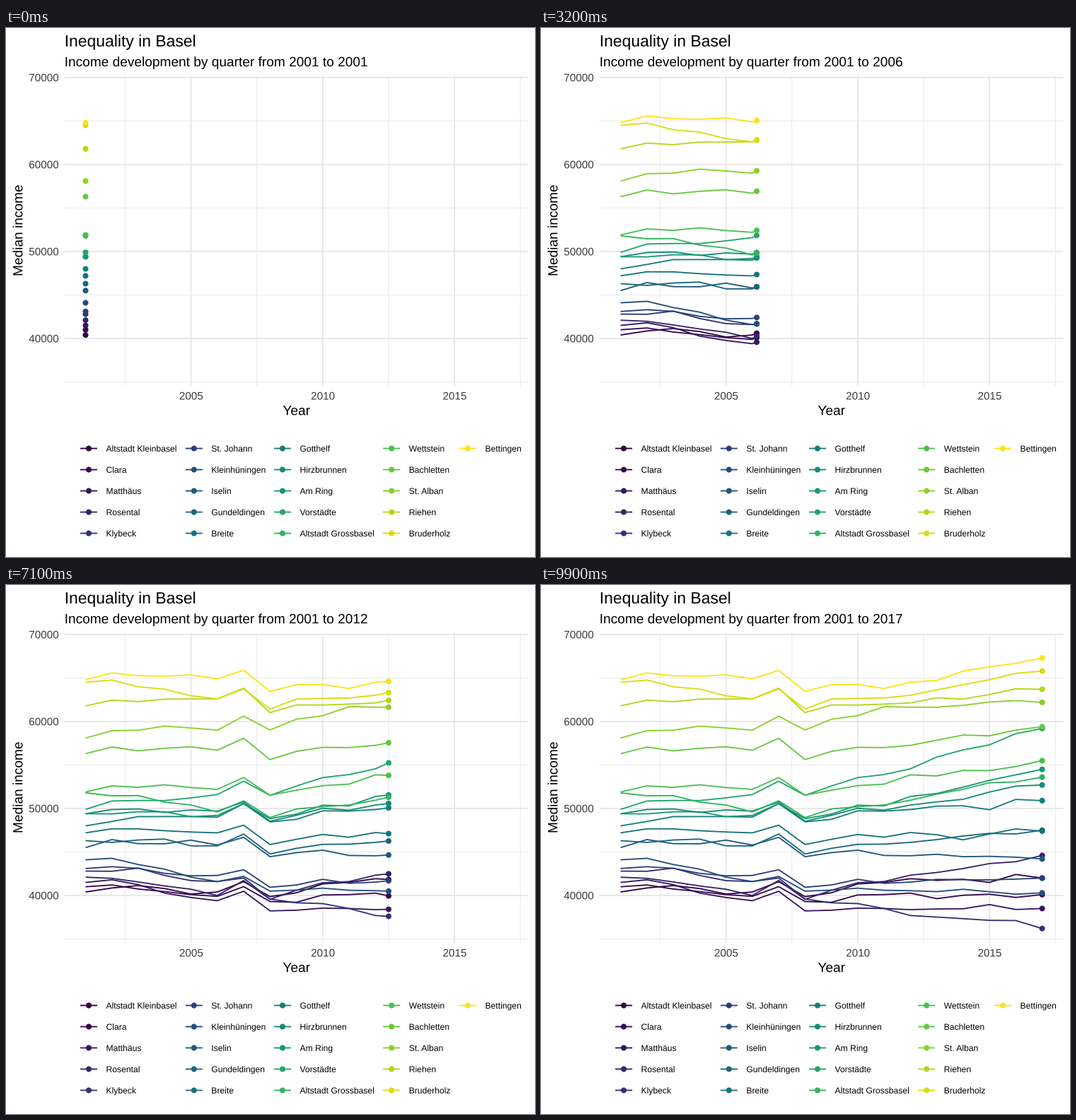
A matplotlib script that plays this animation: 748 px wide and 748 px high, repeating every 10000 ms.

```python
import numpy as np
import matplotlib.pyplot as plt
from matplotlib.animation import FuncAnimation
from matplotlib.patches import PathPatch
from matplotlib.textpath import TextPath
from matplotlib.transforms import Affine2D

plt.rcParams["font.family"] = "Liberation Sans"

SIZE, DPI, FRAMES = 748, 125, 100
LEFT, RIGHT, TOP, BOTTOM = 82.7, 738.45, 67.6, 505.8
LINE, DOT = 1.067, 4.65
YEARS = np.arange(2001, 2018)
# the frame on which each year is reached
KEYS = [round(k * (FRAMES - 1) / 16) for k in range(17)]

# every income follows a trend, the city's business cycle and some noise
TURNS = [2001, 2006, 2011, 2017]
CYCLE = np.interp(YEARS, [2001, 2002, 2006, 2007, 2008, 2009, 2010],
                  [0, 0.5, 0, 1.1, -1, -0.4, 0])
rng = np.random.default_rng(4)
quarters = []


def quarter(name, *trend):
    """Add a quarter; the trend is in thousands at each turning year."""
    noise = np.where(np.isin(YEARS, TURNS), 0, rng.normal(0, 0.22, len(YEARS)))
    quarters.append((name, 1000 * (np.interp(YEARS, TURNS, trend) + CYCLE + noise)))


quarter("Altstadt Kleinbasel", 40.4, 40.4, 41.5, 42)
quarter("Clara", 41, 39.9, 40.1, 40.1)
quarter("Matthäus", 41.5, 39.4, 38.5, 38.5)
quarter("Rosental", 42.1, 40, 41.6, 44.6)
quarter("Klybeck", 42.8, 41.6, 38.5, 36.2)
quarter("St. Johann", 43.1, 42.3, 41.4, 42)
quarter("Kleinhüningen", 44.1, 41.6, 40.6, 40.3)
quarter("Iselin", 45.5, 45.8, 44.6, 44.2)
quarter("Gundeldingen", 46.3, 45.7, 45.9, 47.5)
quarter("Breite", 47.2, 47.2, 46.7, 47.4)
quarter("Gotthelf", 48, 49, 49.7, 50.9)
quarter("Hirzbrunnen", 49.4, 49.7, 49.8, 52.7)
quarter("Am Ring", 49.4, 49.2, 50.3, 54.5)
quarter("Vorstädte", 49.9, 51.6, 53.9, 59.2)
quarter("Altstadt Grossbasel", 51.8, 49.6, 50.4, 53.6)
quarter("Wettstein", 51.9, 52.2, 52.8, 55.5)
quarter("Bachletten", 56.3, 56.7, 57, 59.4)
quarter("St. Alban", 58.1, 59, 61.7, 62.2)
quarter("Riehen", 61.8, 62.6, 62, 63.7)
quarter("Bruderholz", 64.5, 62.6, 62.7, 65.8)
quarter("Bettingen", 64.8, 64.9, 63.8, 67.3)


def shade(rgb):
    """Slightly deeper tone, as on a 1.8 gamma display."""
    return tuple(np.array(rgb) ** (2.2 / 1.8))


COLORS = [shade(c[:3]) for c in plt.cm.viridis(np.linspace(0, 1, len(quarters)))]
GRID, GREY = shade([0.922] * 3), shade([0.302] * 3)


def px(year):
    return LEFT + (year - 2000.2) * (RIGHT - LEFT) / 17.6


def py(income):
    return 70 + (70000 - income) * 0.0123


fig = plt.figure(figsize=(SIZE / DPI, SIZE / DPI), dpi=DPI, facecolor="white")
ax = fig.add_axes([0, 0, 1, 1])
ax.set_xlim(0, SIZE)
ax.set_ylim(SIZE, 0)
ax.axis("off")


def glyphs(text, size=11):
    return TextPath((0, 0), text, size=size * DPI / 72)


def label(x, y, text, size=11, color="black", align=0, angle=0):
    """Text on baseline y; align 0 is left, 0.5 centre, 1 right."""
    path = glyphs(text, size)
    shift = -align * path.get_extents().x1
    place = Affine2D().translate(shift, 0).rotate_deg(angle).scale(1, -1).translate(x, y)
    return ax.add_patch(PathPatch(path, fc=color, lw=0, zorder=2,
                                  transform=place + ax.transData))


def line(xs, ys, color, width=LINE, z=1):
    return ax.plot(xs, ys, color=color, lw=width, zorder=z, snap=False,
                   solid_capstyle="butt", solid_joinstyle="round")[0]


def dots(xs, ys):
    return ax.scatter(xs, ys, s=DOT ** 2, c=COLORS, lw=0, zorder=4, snap=False)


# grid: thin minor lines, thicker major ones
for year in np.arange(2002.5, 2018, 2.5):
    major = year % 5 == 0
    line([px(year)] * 2, [TOP, BOTTOM], GRID, LINE if major else LINE / 2)
    if major:
        label(px(year), 525.4, f"{year:.0f}", 8.8, GREY, align=0.5)
for income in range(35000, 70001, 5000):
    major = income % 10000 == 0
    line([LEFT, RIGHT], [py(income)] * 2, GRID, LINE if major else LINE / 2)
    if major:
        label(74.1, py(income) + 5.4, str(income), 8.8, GREY, align=1)

label(LEFT, 26.1, "Inequality in Basel", 13.2)
subtitle = label(LEFT, 54.2, "Income")
label((LEFT + RIGHT) / 2, 547.2, "Year", align=0.5)
label(23.3, (TOP + BOTTOM) / 2, "Median income", align=0.5, angle=90)

# legend, filled column by column
COLUMNS = [117, 265.8, 391, 545.2, 653]
spots = np.array([(COLUMNS[i // 5], 594.5 + 30 * (i % 5)) if i < 20 else (COLUMNS[4], 594.5)
                  for i in range(len(quarters))])
for (name, _), (x, y), color in zip(quarters, spots, COLORS):
    line([x - 12, x + 12], [y, y], color)
    label(x + 24.5, y + 4.4, name, 7)
dots(*spots.T)

lines = [line([], [], c, z=3) for c in COLORS]
heads = dots(*spots.T)


def update(i):
    now = np.interp(i, KEYS, YEARS)
    past = YEARS < now
    xs = px(np.append(YEARS[past], now))
    tips = []
    for (_, income), path in zip(quarters, lines):
        ys = py(np.append(income[past], np.interp(now, YEARS, income)))
        path.set_data(xs, ys)
        tips.append((xs[-1], ys[-1]))
    heads.set_offsets(tips)
    subtitle.set_path(glyphs(
        f"Income development by quarter from 2001 to {round(float(now))}"))
    return [*lines, heads, subtitle]


anim = FuncAnimation(fig, update, frames=FRAMES, interval=100, repeat=True,
                     repeat_delay=0, blit=False)
plt.show()
```
